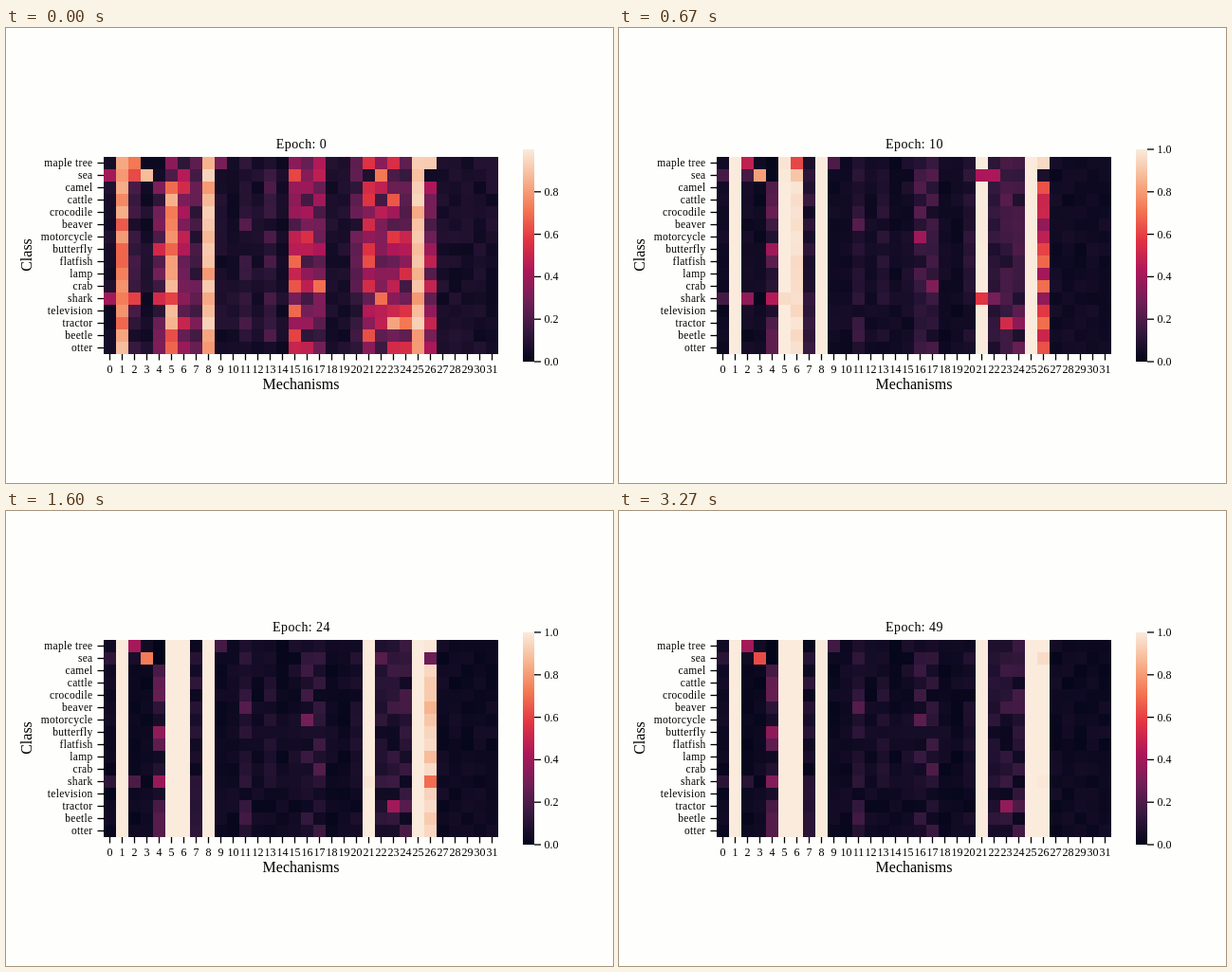
Recreate the animation shown at these times as an HTML page. Size 640 px wide and 480 px high, loop 3340 ms.

```html
<!DOCTYPE html>
<html lang="en">
<head>
<meta charset="utf-8">
<title>Mechanisms per class</title>
<style>
  html, body { margin: 0; width: 100%; height: 100%; overflow: hidden; background: #fefefc; }
  svg { display: block; width: 640px; height: 480px; }
  text { font: 12px "Liberation Serif", "Noto Serif", serif; text-anchor: middle; }
  .name { text-anchor: end; font-size: 11.5px; letter-spacing: .3px; }
  .scale { text-anchor: start; }
  .title { font-size: 14px; letter-spacing: .4px; }
  .axis { font-size: 16px; }
  .cell { shape-rendering: crispEdges; }
  line { stroke: #000; stroke-width: 1.3; }
</style>
</head>
<body>
<svg viewBox="0 0 640 480"></svg>
<script>
const svg = document.querySelector('svg');
const LOOP = 3340, EPOCHS = 50, COLS = 32, SIZE = 13, LEFT = 103, TOP = 136;
const BAR = { x: 545, y: 128, w: 12, h: 224 };
const names = ['maple tree', 'sea', 'camel', 'cattle', 'crocodile', 'beaver', 'motorcycle', 'butterfly',
  'flatfish', 'lamp', 'crab', 'shark', 'television', 'tractor', 'beetle', 'otter'];
const palette = ['#03051a', '#35193e', '#701f57', '#ad1759', '#e13342', '#f37651', '#f6b48f', '#faebdd'];
const steps = palette.length - 1;
const rgb = palette.map(c => [1, 3, 5].map(i => parseInt(c.slice(i, i + 2), 16)));

const mix = (a, b, k) => a + (b - a) * k;
const logit = p => Math.log(p / (1 - p));

function color(v) {
  const x = Math.min(1, Math.max(0, v)) * steps, i = Math.min(steps - 1, Math.floor(x));
  return `rgb(${rgb[i].map((a, n) => Math.round(mix(a, rgb[i + 1][n], x - i)))})`;
}

function noise(row, col, seed) {
  const s = Math.sin(row * 127.1 + col * 311.7 + seed) * 43758.5453;
  return (s - Math.floor(s)) * 2 - 1;
}

// Weights either saturate at 1 along a logistic curve or fade to a rest level.
const grow = (start, time) => e => 1 / (1 + Math.exp(-logit(start) - (e / time) ** 1.5));
const fade = (start, end, time = 7) => e => mix(end, start, Math.exp(-e / time));

// Columns that grow: start level and time scale in epochs.
const growing = { 1: [.76, 1.5], 5: [.75, 2.2], 6: [.4, 3.9], 8: [.86, 1.5], 21: [.5, 2.9], 25: [.87, 1.5], 26: [.34, 11] };

// Columns that fade visibly: start level, rest level, time scale.
const fading = {
  2: [.13, .02], 4: [.2, .15], 7: [.2, .07], 11: [.13, .1], 13: [.13, .06], 15: [.45, .05, 2.5], 16: [.3, .09],
  17: [.3, .09], 20: [.18, .05], 22: [.32, .07, 5], 23: [.42, .1], 24: [.36, .1]
};

// The few cells that leave their column's trend.
const special = {
  'maple tree': { 2: fade(.72, .4), 4: fade(.03, 0), 5: grow(.35, 3.5), 6: grow(.12, 5.5), 9: fade(.3, .17), 26: grow(.92, 14) },
  sea: { 0: fade(.4, .11), 2: fade(.62, .04), 3: fade(.88, .42, 60), 4: fade(.05, 0),
    5: grow(.2, 3), 6: grow(.45, 5.5), 21: grow(.08, 6), 22: fade(.72, .06, 17), 26: grow(.04, 14.2) },
  beaver: { 11: fade(.22, .22) },
  motorcycle: { 16: fade(.55, .22, 16) },
  butterfly: { 4: fade(.52, .35) },
  crab: { 17: fade(.7, .2) },
  shark: { 0: fade(.4, .11), 2: fade(.6, .08, 16), 4: fade(.53, .3, 22), 5: grow(.6, 5), 21: grow(.25, 8), 22: fade(.7, .1, 9), 26: grow(.25, 15.5) },
  tractor: { 23: fade(.82, .36, 10), 24: fade(.72, .2, 8) }
};

function curve(row, col) {
  const own = special[names[row]]?.[col];
  if (own) return own;
  const n = noise(row, col, 4);
  if (growing[col]) {
    const [start, time] = growing[col];
    return grow(start + start * (1 - start) * n * .7, time);
  }
  const [start, end, time] = fading[col] || [.06, .03];
  return fade(start * (1 + .6 * n), end * (1 + .8 * noise(row, col, 9)), time);
}

function add(tag, attrs, text = '', parent = svg) {
  const el = document.createElementNS('http://www.w3.org/2000/svg', tag);
  for (const key in attrs) el.setAttribute(key, attrs[key]);
  el.textContent = text;
  return parent.appendChild(el);
}
const tick = (x1, y1, x2, y2) => add('line', { x1, y1, x2, y2 });
const label = (x, y, text, cls = '') => add('text', { x, y, class: cls }, text);

const cells = [];
names.forEach((name, row) => {
  const y = TOP + row * SIZE;
  for (let col = 0; col < COLS; col++) {
    const el = add('rect', { x: LEFT + col * SIZE, y, width: SIZE, height: SIZE, class: 'cell' });
    cells.push({ el, level: curve(row, col) });
  }
  tick(LEFT - 6.5, y + 6.5, LEFT, y + 6.5);
  label(91.5, y + 10, name, 'name');
});

for (let col = 0; col < COLS; col++) {
  const x = LEFT + (col + .5) * SIZE;
  tick(x, 344, x, 350.5);
  label(x, 363.5, col);
}

const ramp = add('linearGradient', { id: 'ramp', x1: 0, y1: 1, x2: 0, y2: 0 });
palette.forEach((c, i) => add('stop', { offset: i / steps, 'stop-color': c }, '', ramp));
add('rect', { x: BAR.x, y: BAR.y, width: BAR.w, height: BAR.h, fill: 'url(#ramp)' });

let topMark;
for (let i = 0; i <= 5; i++) {
  const y = BAR.y + BAR.h * (1 - i / 5);
  topMark = [tick(557, y, 564, y), label(567.5, y + 4, (i / 5).toFixed(1), 'scale')];
}

const title = label(311.5, 127, '', 'title');
label(311, 381, 'Mechanisms', 'axis');
add('text', { class: 'axis', transform: 'translate(26.5 239.5) rotate(-90)' }, 'Class');

let shown = -1;
function draw(now) {
  const epoch = Math.min(EPOCHS - 1, Math.floor((now % LOOP) * .015 + .06));
  if (epoch === shown) return;
  shown = epoch;
  title.textContent = `Epoch: ${epoch}`;
  for (const { el, level } of cells) el.setAttribute('fill', color(level(epoch)));
  // The scale only reaches 1.0 after the first epoch.
  for (const el of topMark) el.setAttribute('visibility', epoch ? 'visible' : 'hidden');
}

const begin = performance.now();
function loop() {
  draw(performance.now() - begin);
  requestAnimationFrame(loop);
}
loop();
</script>
</body>
</html>
```
